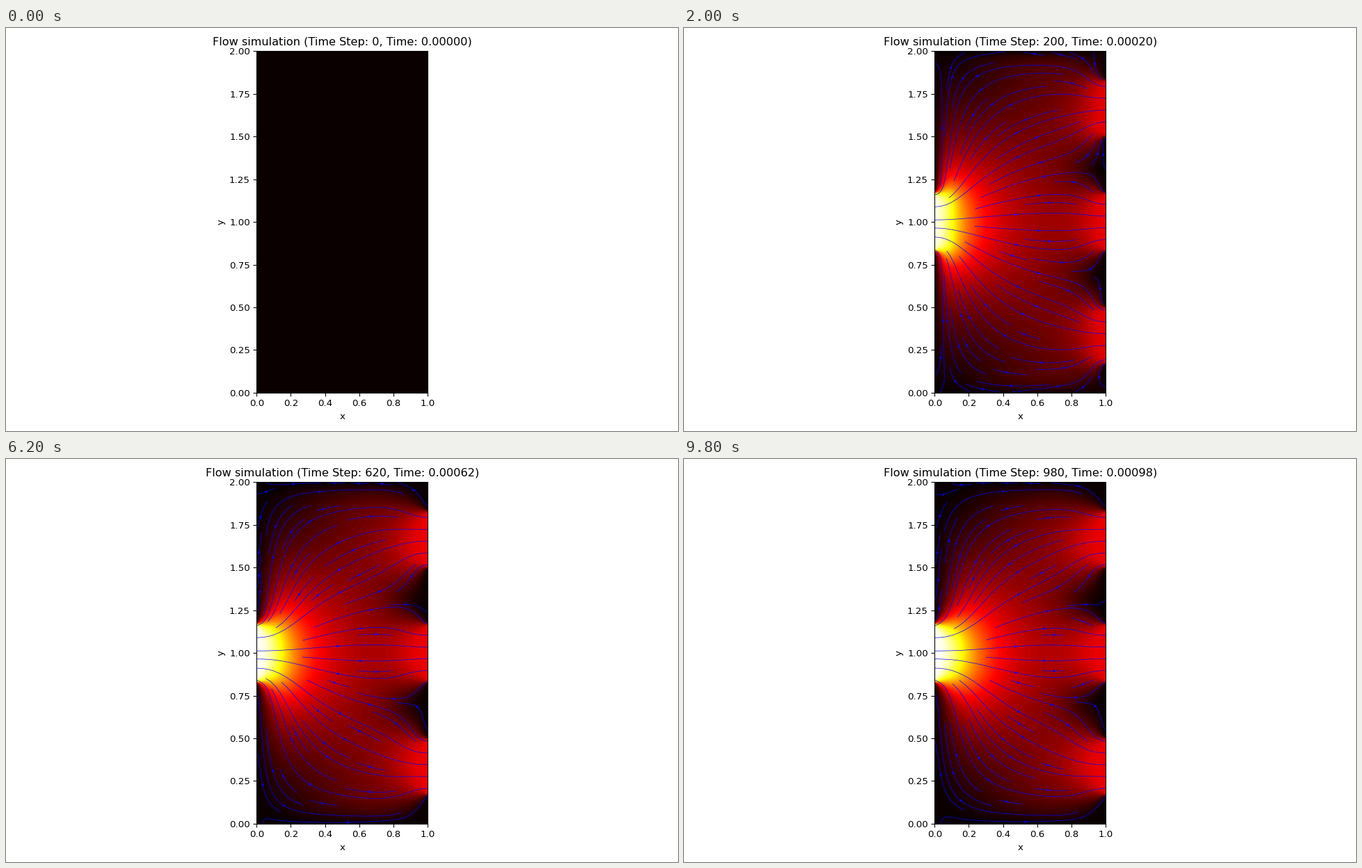
Animation of 966 by 580 pixels, one loop 10 s. Source, as a matplotlib script:

```python
import numpy as np
import matplotlib.pyplot as plt
from matplotlib.animation import FuncAnimation

W, H, DPI = 966, 580, 96.6
FRAMES, INTERVAL = 50, 200
STEPS_PER_FRAME, STEP_TIME = 20, 1e-6

# Staggered grid on the 1 x 2 box
NX, NY = 100, 200
CELL = 1 / NX
NU = 8.0
SUBSTEPS = 10
DT = STEPS_PER_FRAME * STEP_TIME / SUBSTEPS
LEAK = 1.5e-4     # wall flux per unit of pressure

yc = (np.arange(NY) + 0.5) * CELL


def port(center):
    return (np.abs(yc - center) < 1 / 6).astype(float)


inlet = port(1)
outlet = port(1 / 3) + port(1) + port(5 / 3)
outlet *= inlet.sum() / outlet.sum()


def modes(n):
    """Eigenmodes of the 1D pressure operator with leaky ends."""
    a = 2 * np.eye(n) - np.eye(n, k=1) - np.eye(n, k=-1)
    a[0, 0] = a[-1, -1] = 1
    a *= DT / CELL**2
    a[0, 0] += LEAK / CELL
    a[-1, -1] += LEAK / CELL
    return np.linalg.eigh(a)


def ghost(f, axis):
    """Add mirrored cells so the tangential velocity vanishes on the wall."""
    if axis == 0:
        return np.concatenate([-f[:1], f, -f[-1:]], axis=0)
    return np.concatenate([-f[:, :1], f, -f[:, -1:]], axis=1)


def to_nodes(u, v):
    gu, gv = ghost(u, 1), ghost(v, 0)
    return (gu[:, 1:] + gu[:, :-1]).T / 2, (gv[1:] + gv[:-1]).T / 2


def set_walls(u, v):
    u[0], u[-1] = inlet, outlet
    v[:, 0] = v[:, -1] = 0


def simulate():
    lx, qx = modes(NX)
    ly, qy = modes(NY)
    inv = 1 / (lx[:, None] + ly[None, :])
    u = np.zeros((NX + 1, NY))
    v = np.zeros((NX, NY + 1))
    u[0] = inlet
    fields = [to_nodes(u, v)]
    r = NU * DT / CELL**2
    g = DT / CELL
    for _ in range(FRAMES - 1):
        for _ in range(SUBSTEPS):
            set_walls(u, v)
            lap_u = np.diff(u, 2, axis=0) + np.diff(ghost(u, 1), 2, axis=1)[1:-1]
            lap_v = np.diff(v, 2, axis=1) + np.diff(ghost(v, 0), 2, axis=0)[:, 1:-1]
            u[1:-1] += r * lap_u
            v[:, 1:-1] += r * lap_v
            div = (np.diff(u, axis=0) + np.diff(v, axis=1)) / CELL
            p = -qx @ ((qx.T @ div @ qy) * inv) @ qy.T
            u[1:-1] -= g * np.diff(p, axis=0)
            v[:, 1:-1] -= g * np.diff(p, axis=1)
            u[0] -= LEAK * p[0]
            u[-1] += LEAK * p[-1]
            v[:, 0] -= LEAK * p[:, 0]
            v[:, -1] += LEAK * p[:, -1]
        fields.append(to_nodes(u, v))
    return fields


fields = simulate()
xs = np.linspace(0, 1, NX + 1)
ys = np.linspace(0, 2, NY + 1)

fig = plt.figure(figsize=((W + 0.01) / DPI, (H + 0.01) / DPI), dpi=DPI)
ax = fig.add_axes([360.3 / W, 55.2 / H, 245.7 / W, 491.4 / H])
pad = CELL / 2
image = ax.imshow(np.zeros((NY + 1, NX + 1)), origin="lower", aspect="auto",
                  extent=[-pad, 1 + pad, -pad, 2 + pad], vmin=0, vmax=1,
                  cmap=plt.get_cmap("hot", 100), interpolation="bilinear")
ax.set_xlabel("x")
ax.set_ylabel("y")
title = ax.set_title("")
ax.set_xlim(0, 1)
ax.set_ylim(0, 2)


def clear_lines():
    for artist in list(ax.collections) + list(ax.patches):
        artist.remove()


def update(k):
    u, v = fields[k]
    clear_lines()
    image.set_data(np.hypot(u, v))
    image.set_interpolation("bilinear" if k else "nearest")
    if k:
        ax.streamplot(xs, ys, u, v, density=1, color="blue",
                      linewidth=0.5, arrowsize=0.5)
        ax.set_xlim(0, 1)
        ax.set_ylim(0, 2)
    step = k * STEPS_PER_FRAME
    title.set_text(f"Flow simulation (Time Step: {step}, Time: {step * STEP_TIME:.5f})")
    return []


anim = FuncAnimation(fig, update, frames=FRAMES, interval=INTERVAL,
                     init_func=lambda: update(0), repeat=True, blit=False)
plt.show()
```
